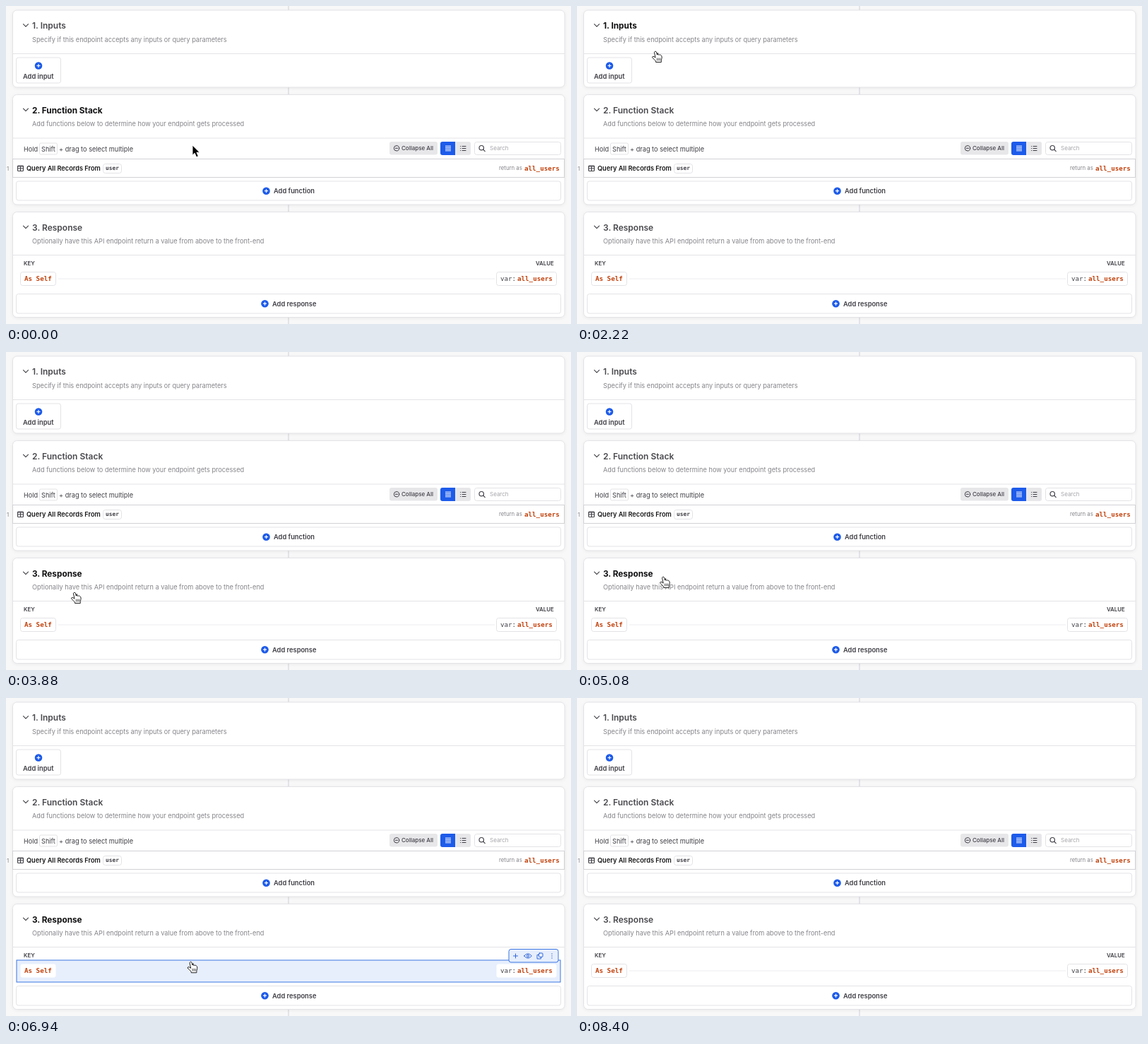
Write an HTML page that moves like this. It is 800 px wide and 450 px high and loops after 8920 ms.

```html
<!DOCTYPE html>
<html lang="en">
<head>
<meta charset="utf-8">
<title>Endpoint editor</title>
<style>
  html, body { margin: 0; width: 100%; height: 100%; overflow: hidden; background: #f8f8f9; }
  svg { display: block; width: 800px; height: 450px; font-family: Inter, sans-serif; font-size: 9.2px; fill: #3f3f46; }
  .card { fill: #fff; stroke: #e3e3e7; filter: drop-shadow(0 1px 2px #0000000f); }
  .line { stroke: #e3e3e7; fill: none; }
  .box { fill: #fff; stroke: #e3e3e7; }
  .title { font-size: 12px; font-weight: 600; fill: #4a4a4f; }
  .title.active { fill: #101012; font-weight: 700; font-size: 11.8px; }
  .note { fill: #85858b; }
  .strong { font-weight: 600; font-size: 9.3px; }
  .small { font-size: 7.8px; }
  .mono { font-family: "DejaVu Sans Mono", monospace; }
  .var { font-weight: 700; fill: #c2410c; }
  .icon { fill: none; stroke: #3f3f46; stroke-linecap: round; stroke-linejoin: round; }
  .tools .icon { stroke: #2f66d8; }
  .hover .pill { stroke: none; }
  .tools, .highlight { visibility: hidden; }
  .hover .tools, .hover .highlight { visibility: visible; }
</style>
</head>
<body>
<svg viewBox="0 0 800 450">
  <defs>
    <g id="plus">
      <circle r="5.3" fill="#1d5bea"/>
      <path d="M-2.5 0h5M0-2.5v5" stroke="#fff" stroke-width="1.2"/>
    </g>
    <path id="chevron" class="icon" d="M-3.5-1.8L0 1.7 3.5-1.8" stroke-width="1.1"/>
  </defs>

  <path d="M400 0V450" stroke="#e4e4e8" stroke-width="2"/>
  <g class="card">
    <rect x="9.5" y="6" width="781.5" height="109" rx="6"/>
    <rect x="9.5" y="125.5" width="781.5" height="155.5" rx="6"/>
    <rect x="9.5" y="291.5" width="781.5" height="149" rx="6"/>
  </g>
  <path class="line" d="M10 67.5H791M10 187H791M10 352.5H791"/>

  <!-- Inputs -->
  <use href="#chevron" x="28" y="27.5"/>
  <text class="title" x="37" y="32">1. Inputs</text>
  <text class="note" x="37" y="50.5">Specify if this endpoint accepts any inputs or query parameters</text>
  <rect class="box" x="14.5" y="73" width="63" height="36" rx="3"/>
  <use href="#plus" x="46" y="84.5"/>
  <text class="strong" x="24" y="103">Add input</text>

  <!-- Function stack -->
  <use href="#chevron" x="28" y="147"/>
  <text class="title" x="37" y="151.5">2. Function Stack</text>
  <text class="note" x="37" y="170.3">Add functions below to determine how your endpoint gets processed</text>
  <text x="25" y="205.5">Hold</text>
  <rect class="box" x="47.5" y="194" width="25" height="16" rx="2"/>
  <text x="50" y="205.5">Shift</text>
  <text x="75" y="205.5">+ drag to select multiple</text>

  <rect x="543" y="192" width="68" height="18.5" rx="3" fill="#e7e7ea"/>
  <g class="icon"><circle cx="553" cy="201.3" r="3.7"/><path d="M551.3 201.3h3.4"/></g>
  <text x="560" y="204.3" font-size="8" font-weight="500">Collapse All</text>
  <path d="M636 192h19a3 3 0 0 1 3 3v13a3 3 0 0 1-3 3h-19z" fill="#e7e7ea"/>
  <path d="M618 192h18v19h-18a3 3 0 0 1-3-3v-13a3 3 0 0 1 3-3z" fill="#1d5bea"/>
  <path d="M622 198.2h8M622 200.4h8M622 202.6h8M622 204.8h8" stroke="#fff"/>
  <path class="icon" d="M643.5 198.5h.2M643.5 201.5h.2M643.5 204.5h.2M646 198.5h5M646 201.5h5M646 204.5h5"/>
  <rect class="box" x="663.5" y="192.5" width="122" height="18" rx="3"/>
  <g class="icon" stroke-width="1.2"><circle cx="673.2" cy="200.7" r="3.2"/><path d="M675.7 203.2l2.5 2.5"/></g>
  <text x="685" y="204.3" font-size="8" fill="#a5a5ab">Search</text>

  <rect x="9.5" y="216.5" width="781" height="26" fill="#fff" stroke="#d2d2d6"/>
  <text class="small" x="1" y="233" fill="#85858b">1</text>
  <g class="icon" stroke-width="1.1">
    <rect x="16.5" y="226" width="8" height="7.5" rx="1"/>
    <path d="M16.5 227h8M16.5 230h8M20.5 227v6.5"/>
  </g>
  <text class="strong" x="29" y="233.4" style="fill:#161618;font-size:9.2px">Query All Records From</text>
  <rect class="box" x="137.5" y="223.5" width="26" height="13" rx="3"/>
  <text class="mono" x="141" y="232.4" font-size="7.9" font-weight="700">user</text>
  <text class="small note" x="698" y="232.3">return as</text>
  <text class="mono var" x="734" y="233">all_users</text>
  <rect class="box" x="14.5" y="248" width="771" height="27" rx="3"/>
  <use href="#plus" x="368.5" y="261.7"/>
  <text class="strong" x="379" y="265.3">Add function</text>

  <!-- Response -->
  <use href="#chevron" x="28" y="313"/>
  <text class="title" x="37" y="317.7">3. Response</text>
  <text class="note" x="37" y="336.2">Optionally have this API endpoint return a value from above to the front-end</text>
  <text class="small" x="25" y="367" font-weight="600">KEY</text>
  <text class="small" x="750" y="367" font-weight="600">VALUE</text>
  <g id="row">
    <path d="M74 386H692" stroke="#ededf0"/>
    <rect class="highlight" x="15" y="371" width="770" height="31" fill="#e7effd" stroke="#3b74e2"/>
    <rect class="box pill" x="20.5" y="376.5" width="50" height="19" rx="3"/>
    <text class="mono var" x="26" y="389">As Self</text>
    <rect class="box pill" x="694.5" y="376.5" width="85" height="19" rx="3"/>
    <text class="mono" x="700" y="389">var:</text>
    <text class="mono var" x="724" y="389">all_users</text>
    <g class="tools">
      <rect x="712" y="355.5" width="70" height="18.5" rx="3" fill="#e7effd" stroke="#3b74e2"/>
      <g class="icon">
        <path d="M718.5 365h6M721.5 362v6"/>
        <path d="M733.7 365Q739 358.5 744.3 365 739 371.5 733.7 365z"/>
        <circle cx="739" cy="365" r="1.6"/>
        <rect x="754.5" y="361" width="5.5" height="5.5" rx="1"/>
        <path d="M754.5 363.5h-2.5v5.5h5.5v-2.5"/>
        <path d="M773 362v.1M773 365v.1M773 368v.1" stroke-width="1.4"/>
      </g>
    </g>
  </g>
  <rect class="box" x="14.5" y="407.5" width="771" height="27.5" rx="3"/>
  <use href="#plus" x="366.5" y="421.2"/>
  <text class="strong" x="377" y="424.8">Add response</text>

  <g id="cursor">
    <path id="arrow" d="M0 0V14.2L3.2 11.2 5.6 16.8 8.3 15.6 5.9 10.2H10.2z" fill="#000" stroke="#fff" stroke-width=".9"/>
    <g id="hand" stroke-linecap="round" stroke-linejoin="round" stroke="#222">
      <path d="M-1.4 1Q0-1.2 1.4 1L2.3 4.8Q4-.2+3.6 5 3.8 4.6 5.6 5.1 6.2 4.3 7.8 5.6 9.3 6 9.2 9L8.3 13V15.5H.6V14Q-1.5 11.5-4.6 8.8-4.3 6.7-2 7.6L-.2 8.9z" fill="#fff"/>
      <path d="M2.5 10v3M4.6 10v3M6.6 10v3" stroke-width=".8"/>
    </g>
  </g>
</svg>
<script>
const LOOP = 8920;
const CURSOR_GONE = 8400;
const START = [264, 197];

// Each glide: start time, duration, destination of the pointer tip.
const GLIDES = [
  [20, 400, 260, 194],
  [1100, 880, 111, 64],
  [2220, 880, 92, 215],
  [3640, 840, 98, 367],
  [4840, 880, 128, 306],
  [6680, 800, 281, 383],
  [7800, 880, 330, 560]
];
const SECTIONS = [[6, 115], [126, 281], [292, 440]];
const CLICKABLE = [[6, 67], [126, 187], [216, 242], [292, 352], [371, 402], [408, 435]];
const ROW = [371, 402];

const $ = id => document.getElementById(id);
const titles = document.querySelectorAll(".title");
const within = (y, [top, bottom]) => y >= top && y <= bottom;

// Critically damped spring from 0 to 1.
function spring(progress) {
  const x = 11 * Math.max(0, progress);
  return 1 - (1 + x) * Math.exp(-x);
}

function pointerAt(time) {
  let [x, y] = START;
  for (const [start, duration, toX, toY] of GLIDES) {
    const k = spring((time - start) / duration);
    x += (toX - x) * k;
    y += (toY - y) * k;
  }
  return [x, y];
}

function render(time) {
  const visible = time < CURSOR_GONE;
  const [x, y] = pointerAt(time);
  const clickable = CLICKABLE.some(range => within(y, range));

  titles.forEach((title, i) => title.classList.toggle("active", visible && within(y, SECTIONS[i])));
  $("row").classList.toggle("hover", visible && within(y, ROW));
  $("cursor").style.display = visible ? "" : "none";
  $("cursor").setAttribute("transform", `translate(${x} ${y})`);
  $("arrow").style.display = clickable ? "none" : "";
  $("hand").style.display = clickable ? "" : "none";
}

const origin = performance.now();
function tick() {
  render((performance.now() - origin) % LOOP);
  requestAnimationFrame(tick);
}
tick();
</script>
</body>
</html>
```
